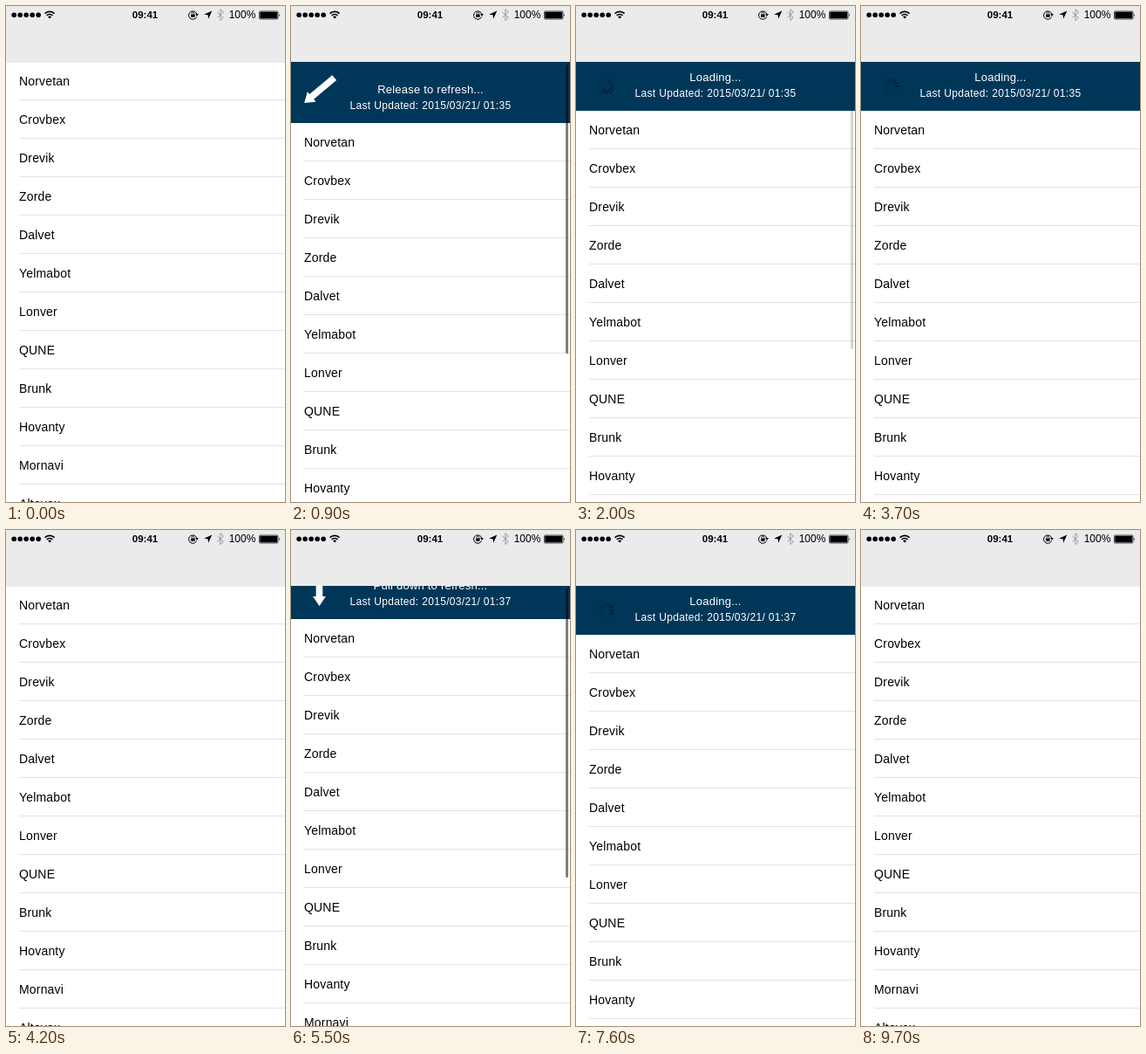
Animation of 320x568 px, one loop 10000 ms. Source, as an HTML page:

```html
<!DOCTYPE html>
<html lang="en">
<head>
<meta charset="utf-8">
<title>Pull to refresh</title>
<style>
  html, body { margin: 0; width: 100%; height: 100%; overflow: hidden; background: #fff; }
  body { position: relative; font-family: "Liberation Sans", Arial, sans-serif; }
  #nav { position: absolute; top: 0; left: 0; width: 320px; background: #ebebeb; }
  #nav svg { display: block; }
  #header { position: absolute; top: 64px; left: 0; width: 320px; overflow: hidden; background: #003759; color: #fff; }
  #header div { position: absolute; width: 320px; height: 20px; text-align: center; white-space: pre; }
  #header #status { bottom: 28px; font: 13px/20px "Liberation Sans", Arial, sans-serif; letter-spacing: .22px; }
  #header #updated { bottom: 10px; font: 12px/20px "Liberation Sans", Arial, sans-serif; letter-spacing: .33px; }
  #header svg { position: absolute; overflow: visible; }
  #arrow { left: 25px; bottom: 15px; width: 15px; height: 45px; }
  #spinner { left: 25px; bottom: 18px; width: 20px; height: 20px; }
  #list { position: absolute; top: 64px; left: 0; width: 320px; margin: 0; padding: 0; list-style: none; background: #fff; }
  #list li { box-sizing: border-box; height: 44px; margin-left: 15px; border-bottom: 1px solid #e2e2e4;
    font: 14px/44px "Liberation Sans", Arial, sans-serif; letter-spacing: .18px; color: #000; }
  #bar { position: absolute; left: 315px; width: 2.5px; border-radius: 1.5px; background: rgba(0, 0, 0, .5); }
</style>
</head>
<body>
<ul id="list"></ul>
<div id="header">
  <svg id="arrow" viewBox="0 0 15 45"><path d="M3.7 0h7.6v34H15L7.5 45 0 34h3.7z" fill="#fff"/></svg>
  <svg id="spinner" viewBox="-10 -10 20 20"></svg>
  <div id="status"></div>
  <div id="updated"></div>
</div>
<div id="bar"></div>
<div id="nav">
  <svg width="320" height="20" viewBox="0 0 320 20">
    <g id="signal"></g>
    <path d="M44.6 8.6a7.8 7.8 0 0 1 11 0M46.7 10.9a4.8 4.8 0 0 1 6.8 0" fill="none" stroke="#000" stroke-width="1.6"/>
    <path d="M50.1 14.6l-2-2.1a2.9 2.9 0 0 1 4 0z"/>
    <text x="159.5" y="14.2" text-anchor="middle" font-size="11.5" font-weight="bold">09:41</text>
    <path d="M218.6 12.4a4.7 4.7 0 1 1 .3-2.6" fill="none" stroke="#000"/>
    <path d="M217 9.2h4l-2 2.6zM212.2 9.5h4.4v3.2h-4.4z"/>
    <path d="M213.1 9.5V8.3a1.3 1.3 0 0 1 2.6 0v1.2" fill="none" stroke="#000" stroke-width=".8"/>
    <path d="M236.3 5.6l-4.2 9.2-.5-4.5-4.5-.5z"/>
    <path d="M242.4 7l7 6.4-3.5 3.2V3.8l3.5 3.2-7 6.4" fill="none" stroke="#999"/>
    <text x="255.7" y="14.3" font-size="12">100%</text>
    <rect x="290.5" y="6" width="21.5" height="9" rx="1.2" fill="none" stroke="#000" stroke-width=".7"/>
    <rect x="291.3" y="6.8" width="19.9" height="7.4" rx=".5"/>
    <path d="M313 8.7q1.6 1.8 0 3.6z"/>
  </svg>
</div>
<script>
const LOOP = 10000, STEP = 100, NAV = 64, REST = 56, THRESHOLD = 65;
const $ = id => document.getElementById(id);

const names = ["Norvetan", "Crovbex", "Drevik", "Zorde", "Dalvet", "Yelmabot",
  "Lonver", "QUNE", "Brunk", "Hovanty", "Mornavi", "Altovex"];
$("list").innerHTML = names.map(n => `<li>${n}</li>`).join("");

$("signal").innerHTML = [0, 1, 2, 3, 4]
  .map(i => `<circle cx="${9.2 + 7 * i}" cy="10.2" r="2.8"/>`).join("");

$("spinner").innerHTML = Array.from({ length: 12 }, (_, i) =>
  `<rect x="-.85" y="-9.4" width="1.7" height="5.3" rx=".85" fill="#001626" transform="rotate(${30 * i})"/>`
).join("");
const petals = [...$("spinner").children];

// Pull distance per step: the drag and its settling, then the way back.
const cycles = [
  { start: 600, load: 1400, end: 3900, date: "01:35",
    pull: [6, 26, 48, 70, 86, 98, 106, 108, 95, 72, 61, 57], back: [40, 17, 5] },
  { start: 5300, load: 6200, end: 8600, date: "01:37",
    pull: [6, 20, 38, 58, 76, 90, 100, 106, 106, 91, 70, 60, 57], back: [44, 22, 8, 2] }
];

function distance(c, t) {
  if (t < c.start) return 0;
  return t < c.end
    ? c.pull[(t - c.start) / STEP] ?? REST
    : c.back[(t - c.end) / STEP] ?? 0;
}

function render(time) {
  const t = Math.floor(time % LOOP / STEP) * STEP;
  const c = cycles[t < 4600 ? 0 : 1];
  const d = distance(c, t);
  const loading = t >= c.load && t < c.end;
  const armedAt = c.start + STEP * c.pull.findIndex(p => p > THRESHOLD);
  const armed = t >= armedAt && t < c.load;

  $("nav").style.height = NAV + (d < 1 ? 1 : 0) + "px";
  $("header").style.height = d + "px";
  $("list").style.transform = `translateY(${d}px)`;

  $("status").textContent = loading ? "Loading..."
    : armed ? "Release to refresh..." : "Pull down to refresh...";
  $("updated").textContent = "Last Updated: 2015/03/21/ " + (t >= 3900 ? "01:37" : c.date);

  const turn = armed ? Math.min(1, (t - armedAt + 50) / 180) * 180 : 0;
  $("arrow").style.transform = `rotate(${turn}deg)`;
  $("arrow").style.display = loading ? "none" : "";
  $("spinner").style.display = loading ? "" : "none";
  const head = Math.floor((t - c.load) / 1000 * 12);
  petals.forEach((p, i) => {
    const age = ((head - i) % 12 + 12) % 12;
    p.setAttribute("opacity", Math.max(.2, .9 - age * .09));
  });

  const settled = c.load + 400;
  const fade = t < c.start || t >= c.end ? 0 : Math.max(0, Math.min(1, 1 - (t - settled) / 300));
  $("bar").style.opacity = fade;
  $("bar").style.top = (loading ? Math.max(67, d - 5) : 67) + "px";
  $("bar").style.height = (loading ? 326 : 331) + "px";
}

let origin;
function tick(now) {
  origin ??= now;
  render(Math.max(0, now - origin));
  requestAnimationFrame(tick);
}
render(0);
requestAnimationFrame(tick);
</script>
</body>
</html>
```
